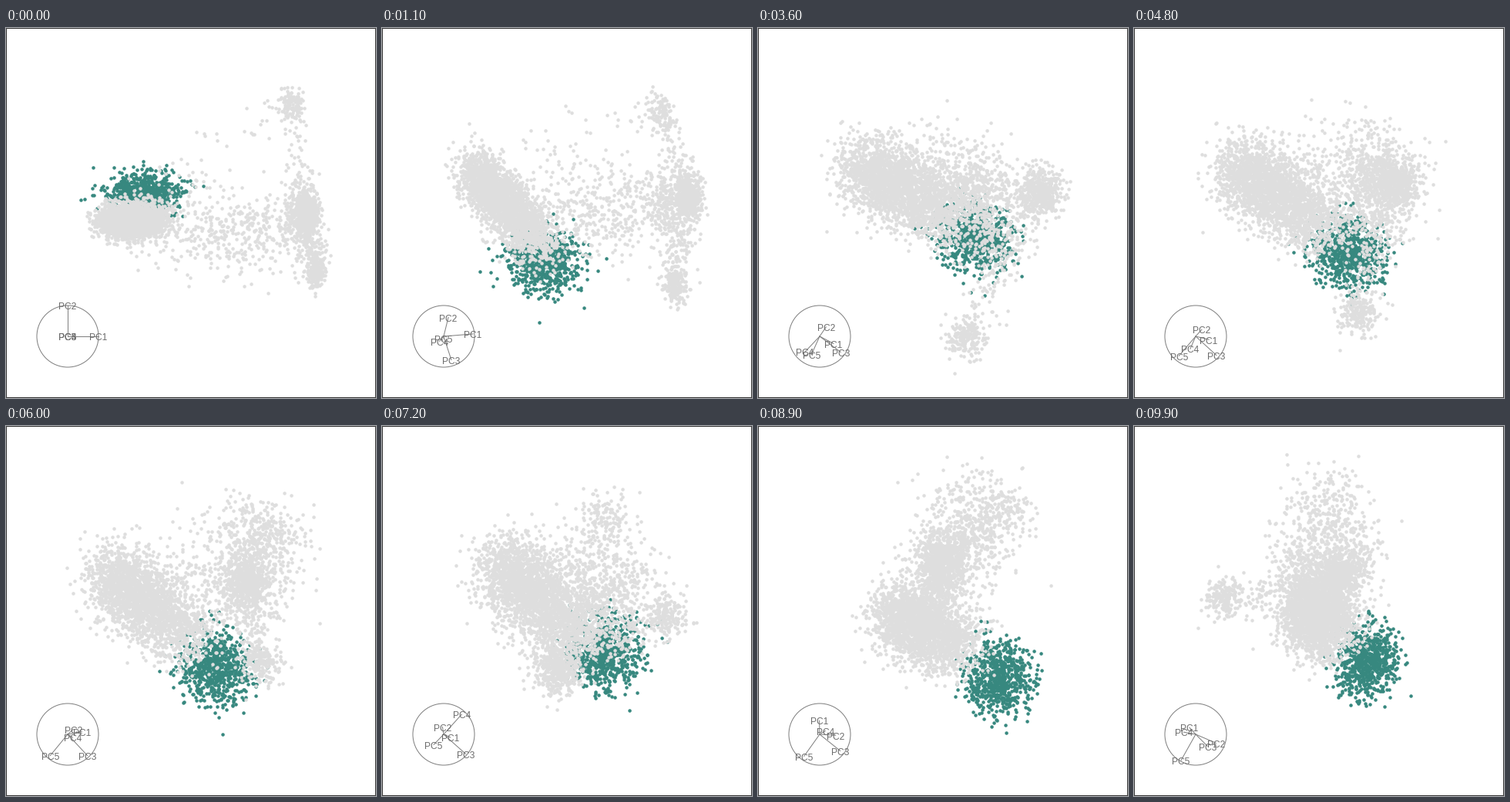
A matplotlib script that plays this animation: 480 px wide and 480 px high, repeating every 10000 ms.

```python
import numpy as np
import matplotlib.pyplot as plt
from matplotlib.animation import FuncAnimation
from matplotlib.patches import Circle, Rectangle

SIZE, DPI = 480, 100
PX = 72 / DPI  # one pixel in points
FRAMES, INTERVAL = 100, 100
MID = SIZE / 2
HUB, REACH = (80, 400), 40
TEAL, PALE, AXIS, LABEL = "#37887f", "#dedede", "#7f7f7f", "#6c6c6c"

rng = np.random.default_rng(7)


def noise(n, first, second, rest):
    """Gaussian scatter; the last three components share one spread."""
    return rng.normal(0, (first, second, rest, rest, rest), (n, 5))


def chain(n, start, end, spread, skew=1.0):
    """Points scattered along the line from start to end."""
    t = rng.random((n, 1)) ** skew
    return (1 - t) * np.array(start) + t * np.array(end) + noise(n, *spread)


def cloud(n, center, spread):
    return np.array(center) + noise(n, *spread)


# Cluster centers in the five components, in pixels from the middle.
MAIN, TAIL = (-98, -10, -80, 0, 4), (-48, -8, 38, -12, 0)
RIGHT = (150, 0, 7, -103, -25)
LOWER = (162, -75, 48, 112, 34)
UPPER = (130, 143, -50, 75, -60)

marked = cloud(740, (-60, 25, 96, -2, 10), (24, 13, 24))
bridge = cloud(430, (55, -24, -15, 15, -100), (55, 26, 34))
bridge[:, 0] = np.clip(bridge[:, 0], -75, 150) + rng.normal(0, 7, len(bridge))

others = np.vstack([
    chain(2400, MAIN, TAIL, (15, 11, 25), skew=1.4),
    cloud(440, RIGHT, (8, 16, 15)),
    cloud(190, LOWER, (6, 10, 13)),
    cloud(110, UPPER, (8, 11, 18)),
    cloud(200, (140, -5, 0, 10, -20), (11, 21, 26)),
    bridge,
    chain(120, RIGHT, LOWER, (10, 12, 16)),
    chain(75, UPPER, RIGHT, (8, 10, 14)),
    chain(55, UPPER, MAIN, (24, 24, 24)),
])

# Key views of the tour by step: how far each component points right and up.
VIEWS = {
    0: [(1, 0, 0, 0, 0), (0, 1, 0, 0, 0)],
    14: [(.92, .2, .3, -.17, 0), (.1, .43, -.86, -.18, -.09)],
    21: [(.74, .22, .32, -.5, .18), (.03, .35, -.75, -.43, -.36)],
    34: [(.45, .21, .68, -.48, -.27), (-.23, .3, -.5, -.5, -.58)],
    45: [(.43, .2, .67, -.18, -.55), (-.1, .22, -.6, -.4, -.63)],
    53: [(.48, .22, .6, .05, -.57), (.11, .12, -.64, -.28, -.68)],
    68: [(.22, -.04, .71, .58, -.32), (-.1, .24, -.63, .64, -.33)],
    84: [(-.01, .51, .66, .18, -.5), (.44, -.03, -.53, .11, -.7)],
    93: [(-.2, .66, .38, -.39, -.48), (.22, -.28, -.38, .07, -.85)],
}
STEPS = list(VIEWS)
BASES = np.array(list(VIEWS.values()), float)
HOLDS = np.array([15, 31, 43, 57, 74, 92])  # the tour rests for one frame


def projection(frame):
    step = frame - np.count_nonzero(HOLDS <= frame)
    place = np.interp(step, STEPS, range(len(STEPS)))
    i = min(int(place), len(STEPS) - 2)
    mixed = BASES[i] + (place - i) * (BASES[i + 1] - BASES[i])
    u, _, vt = np.linalg.svd(mixed, full_matrices=False)
    return u @ vt  # nearest orthonormal pair


fig = plt.figure(figsize=(SIZE / DPI, SIZE / DPI), dpi=DPI, facecolor="white")
ax = fig.add_axes([0, 0, 1, 1])
ax.set(xlim=(0, SIZE), ylim=(SIZE, 0))
ax.axis("off")


def dots(color, z):
    return ax.plot([], [], "o", ms=4.5 * PX, mew=0, color=color, zorder=z)[0]


marked_dots, other_dots = dots(TEAL, 1), dots(PALE, 2)
ax.add_patch(Circle(HUB, REACH, fill=False, ec=AXIS, lw=PX, zorder=3))
ax.add_patch(Rectangle((0.5, 0.5), SIZE - 1, SIZE - 1, fill=False,
                       ec="#333333", lw=PX, snap=False, zorder=5))
spokes = [ax.plot([], [], color=AXIS, lw=PX, zorder=3)[0] for _ in range(5)]
labels = [ax.text(0, 0, f"PC{k + 1}", family="Liberation Sans", size=12 * PX,
                  color=LABEL, ha="center", va="baseline", zorder=4)
          for k in range(5)]


def draw(frame):
    basis = projection(frame)
    for artist, points in ((marked_dots, marked), (other_dots, others)):
        x, y = basis @ points.T
        artist.set_data(MID + x, MID - y)
    for spoke, label, (dx, dy) in zip(spokes, labels, basis.T):
        x, y = HUB[0] + REACH * dx, HUB[1] - REACH * dy
        spoke.set_data([HUB[0], x], [HUB[1], y])
        label.set_position((x, y + 5.3))
    return [marked_dots, other_dots, *spokes, *labels]


anim = FuncAnimation(fig, draw, frames=FRAMES, interval=INTERVAL,
                     repeat=True, repeat_delay=0, blit=False)
plt.show()
```
